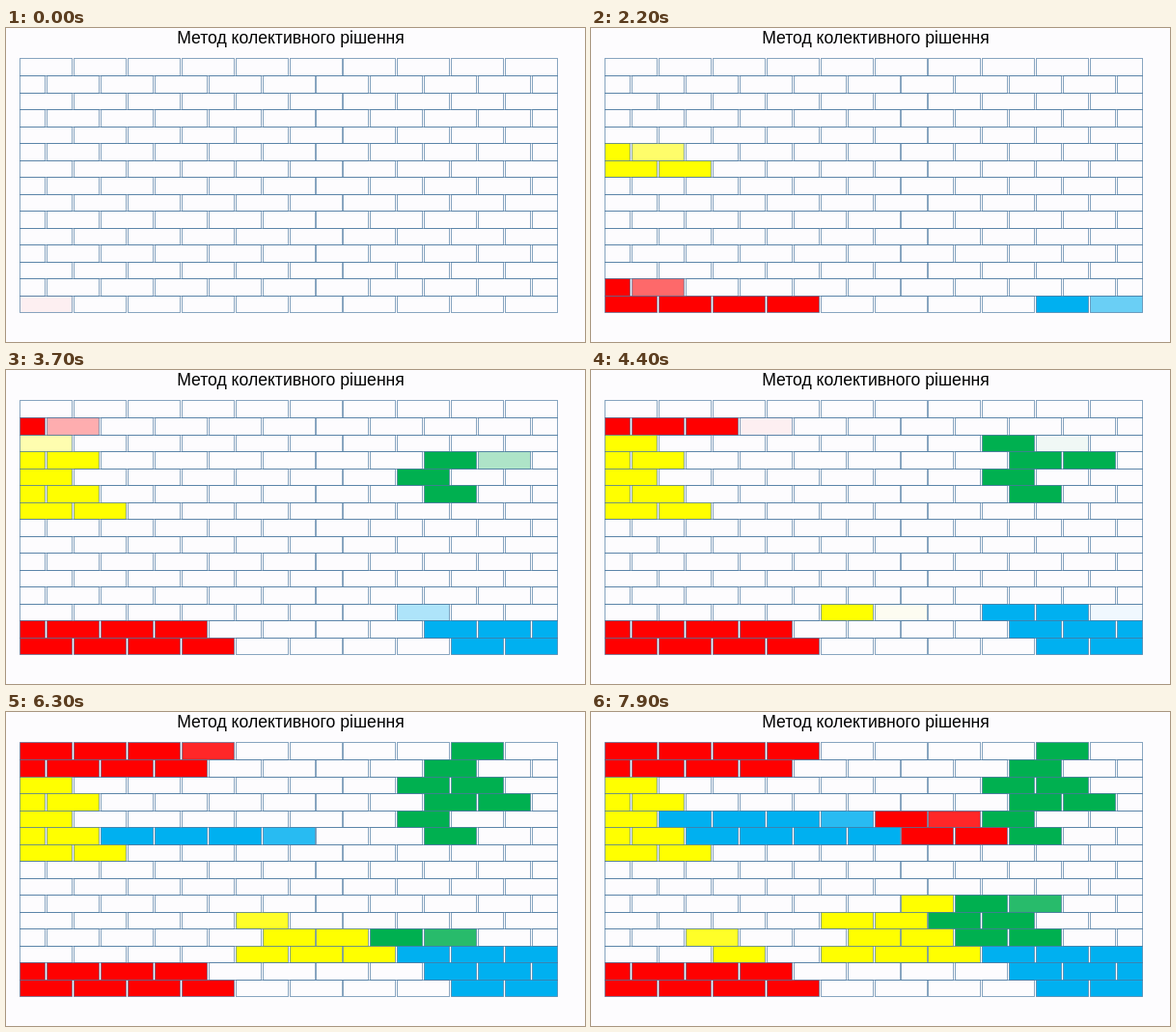
An HTML page that plays this animation: 600x325 px, repeating every 8000 ms.

```html
<!DOCTYPE html>
<html lang="uk">
<head>
<meta charset="utf-8">
<style>
  html, body { margin: 0; width: 100%; height: 100%; overflow: hidden; background: #fdfcfe; }
  svg { display: block; width: 600px; height: 325px; }
  text { font: 17.6px "Liberation Sans", Arial, sans-serif; text-anchor: middle; fill: #000; }
  rect { stroke: #41719c; stroke-opacity: 0.62; fill-opacity: 0; }
</style>
</head>
<body>
<svg viewBox="0 0 600 325">
  <text x="295" y="15.5">Метод колективного рішення</text>
  <g id="wall"></g>
</svg>
<script>
const LOOP = 8000, TICK = 100, STEP = 400;
const ROWS = 15, COLS = 10;
const LEFT = 14.5, TOP = 31.49, PITCH = 55.9, GAP = 1.9, COURSE = 17.53;
const RIGHT = LEFT + PITCH * COLS - GAP;

const wall = document.getElementById('wall');
const snap = v => Math.round(v - 0.5) + 0.5;
const courseY = row => Math.round(TOP + COURSE * row) + 0.5;

// Positions along a course count in half bricks; odd courses start at -1
function makeBrick(row, half) {
  const start = LEFT + PITCH * half / 2;
  const x = snap(Math.max(LEFT, start));
  const right = snap(Math.min(RIGHT, start + PITCH - GAP));
  const y = courseY(row);
  const rect = document.createElementNS('http://www.w3.org/2000/svg', 'rect');
  const attrs = { x, y, width: right - x, height: courseY(row + 1) - y };
  for (const name in attrs) rect.setAttribute(name, attrs[name]);
  return wall.appendChild(rect);
}

const bricks = new Map();
for (let row = 0; row < ROWS; row++)
  for (let half = -(row % 2); half < 2 * COLS; half += 2)
    bricks.set(`${row},${half}`, makeBrick(row, half));

// Builds upwards: each course leans half a brick left (L) or right (R)
// of the one below, then runs rightwards for the given number of bricks
function tower(row, half, plan) {
  return plan.split(' ').flatMap((course, i) => {
    if (i) half += course[0] === 'L' ? -1 : 1;
    const count = Number(course.slice(-1));
    return Array.from({ length: count }, (_, k) => bricks.get(`${row - i},${half + 2 * k}`));
  });
}

const laid = [];

// Every team lays one brick per step
function team(color, firstStep, ...towers) {
  towers.flat().forEach((brick, i) => {
    brick.setAttribute('fill', color);
    laid.push({ brick, begin: (firstStep + i) * STEP });
  });
}

team('#ff0000', 0, tower(14, 0, '4 L4'), tower(1, -1, '4 R4'), tower(5, 11, '2 L2'));
team('#ffff00', 2, tower(6, 0, '2 L2 R1 L2 R1'), tower(12, 8, '3 R2 L2'),
  tower(9, 11, '1'), tower(12, 4, '1 L1'));
team('#00b0f0', 4, tower(14, 16, '2 L3 L3'), tower(5, 3, '4 L4'));
team('#00b050', 6, tower(5, 15, '1 L1 R2 L2 R1 R1'), tower(11, 13, '2 L2 R2'));

function fade(age) {
  if (age < 0) return 0;
  return Math.min(1, 0.05 + 1.06 * age / STEP);
}

function render(time) {
  const t = Math.floor((time % LOOP) / TICK) * TICK;
  for (const { brick, begin } of laid) brick.style.fillOpacity = fade(t - begin);
}

const origin = performance.now();
function frame() {
  render(performance.now() - origin);
  requestAnimationFrame(frame);
}
frame();
</script>
</body>
</html>
```
